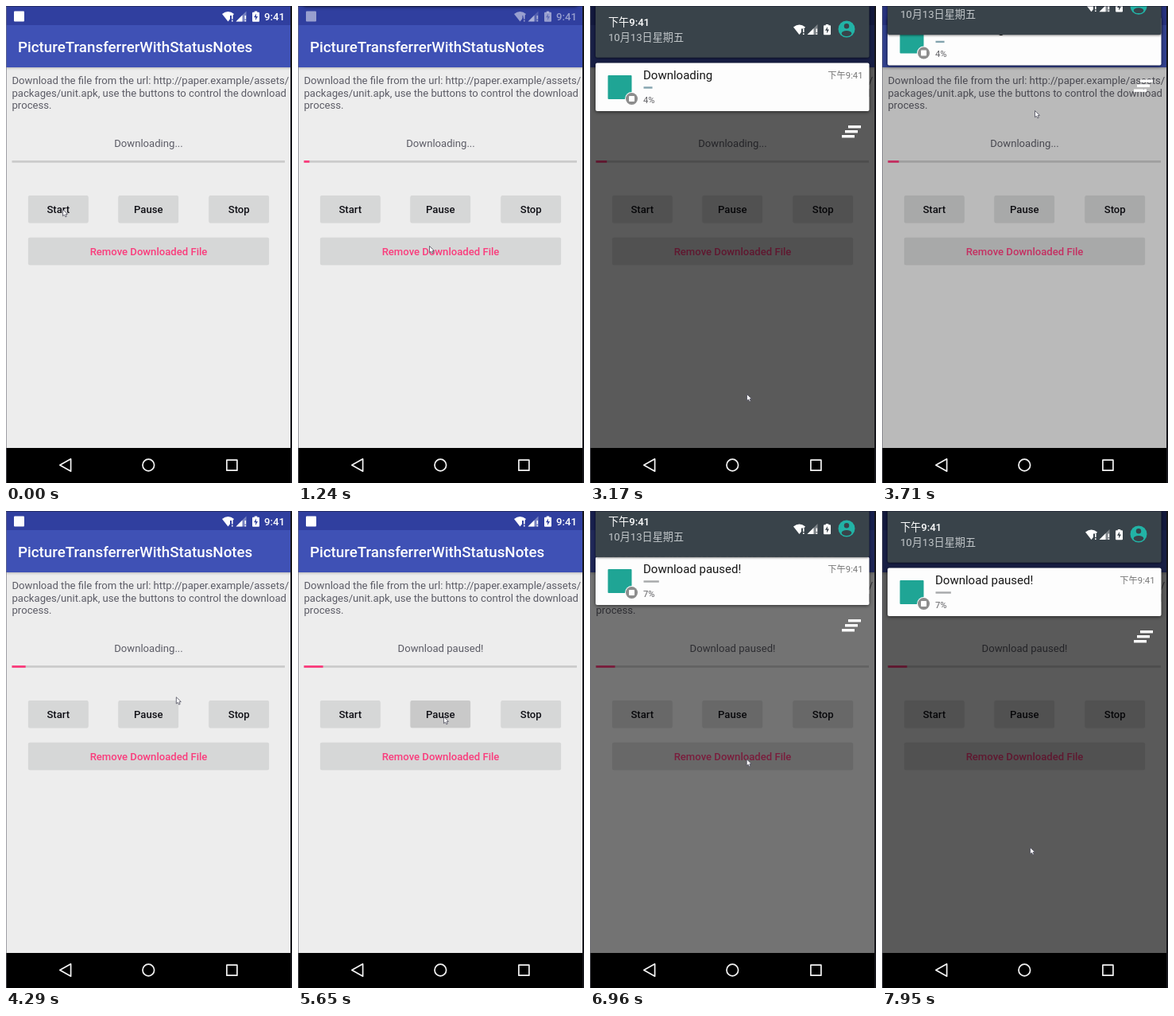
Animation, 360 px wide and 599 px high, one loop 8000 ms. Source, as an HTML page with a canvas:

```html
<!DOCTYPE html>
<html lang="zh-CN">
<head>
<meta charset="utf-8">
<style>
  html, body { margin: 0; width: 100%; height: 100%; overflow: hidden; background: #000; }
  canvas { display: block; width: 360px; height: 599px; }
</style>
</head>
<body>
<canvas id="stage" width="360" height="599"></canvas>
<script>
const ctx = document.getElementById('stage').getContext('2d');
const LOOP = 8000;
const FAMILY = 'Roboto, "Noto Sans CJK SC", "Noto Sans CJK", sans-serif';
const SLATE = '#39434a', PINK = '#fa3c7c', TEAL = '#1fa595', BODY_TEXT = '#5c5c66';
const CARD_BOTTOM = 132;

const spots = {
  start: [71, 255], between: [118, 198], topEdge: [165, 4], remove: [165, 301],
  pauseTop: [170, 265], shadeBottom: [197, 487], card: [192, 131], stop: [214, 234],
  pause: [183, 258], middle: [202, 348], abovePause: [184, 223], lower: [186, 422]
};
const glides = [
  { spot: 'between', from: 319, to: 320 },
  { spot: 'topEdge', from: 540, to: 600 },
  { spot: 'remove', from: 810, to: 1240 },
  { spot: 'pauseTop', from: 1660, to: 1850 },
  { spot: 'shadeBottom', from: 2330, to: 3020 },
  { spot: 'card', from: 3540, to: 3710 },
  { spot: 'stop', from: 3740, to: 4320 },
  { spot: 'pause', from: 4370, to: 4810 },
  { spot: 'topEdge', from: 5740, to: 6140 },
  { spot: 'middle', from: 6530, to: 6700 },
  { spot: 'abovePause', from: 6760, to: 7320 },
  { spot: 'lower', from: 7350, to: 7950 }
];

const clamp01 = v => Math.max(0, Math.min(1, v));

function ease(t, from, to) {
  const u = clamp01((t - from) / (to - from));
  return u * u * (3 - 2 * u);
}

function pointerAt(t) {
  return glides.reduce((pos, { spot, from, to }) => {
    const u = ease(t, from, to);
    return pos.map((v, i) => v + (spots[spot][i] - v) * u);
  }, spots.start);
}

function stateAt(t) {
  const open = ease(t, 1240, 1610) - ease(t, 3540, 3914) + ease(t, 6530, 7070);
  const touched = ease(t, 810, 900) - ease(t, 4000, 4320) + ease(t, 6530, 6620);
  return {
    open,
    shade: -CARD_BOTTOM * (1 - open),
    iconAlpha: 1 - touched / 2,
    percent: Math.max(0, Math.min(7, Math.floor(1 + (t - 320) / 850))),
    paused: t >= 5480,
    pressed: t >= 5400 && t < 5740
  };
}

function rect(x, y, w, h, color, r = 0) {
  ctx.fillStyle = color;
  ctx.beginPath();
  ctx.roundRect(x, y, w, h, r);
  ctx.fill();
}

function disc(x, y, r, color) {
  ctx.fillStyle = color;
  ctx.beginPath();
  ctx.arc(x, y, r, 0, Math.PI * 2);
  ctx.fill();
}

function poly(points, color) {
  ctx.fillStyle = color;
  ctx.beginPath();
  points.forEach(([x, y]) => ctx.lineTo(x, y));
  ctx.closePath();
  ctx.fill();
}

function text(str, x, y, size, color, { weight = 400, align = 'left' } = {}) {
  ctx.font = `${weight} ${size}px ${FAMILY}`;
  ctx.textAlign = align;
  ctx.fillStyle = color;
  ctx.fillText(str, x, y);
}

function withShadow(color, blur, dy, draw) {
  ctx.save();
  ctx.shadowColor = color;
  ctx.shadowBlur = blur;
  ctx.shadowOffsetY = dy;
  draw();
  ctx.restore();
}

function exclamation(x, y) {
  rect(x, y - 1, 1.6, 4.5, '#fff');
  rect(x, y + 4.8, 1.6, 1.6, '#fff');
}

function radioIcons(x, y, batteryGap, bg) {
  ctx.fillStyle = '#fff';
  ctx.beginPath();
  ctx.moveTo(x + 7.5, y + 6.5);
  ctx.lineTo(x, y - 3);
  ctx.quadraticCurveTo(x + 7.5, y - 9, x + 15, y - 3);
  ctx.closePath();
  ctx.fill();
  rect(x + 10, y - 1, 5, 8, bg);
  exclamation(x + 12, y);

  const signal = x + 17.5;
  poly([[signal, y + 6.5], [signal + 13, y + 6.5], [signal + 13, y - 6.5]], 'rgba(255,255,255,.35)');
  poly([[signal, y + 6.5], [signal + 8, y + 6.5], [signal + 8, y - 1.5]], '#fff');
  exclamation(signal + 11, y);

  const battery = x + batteryGap;
  rect(battery + 2.8, y - 6.5, 3.4, 2, '#fff');
  rect(battery, y - 5.3, 9, 12, '#fff', 1);
  poly([[battery + 5, y - 3.5], [battery + 2, y + 1.2], [battery + 4.2, y + 1.2],
        [battery + 4, y + 5], [battery + 7, y], [battery + 4.8, y]], bg);
}

function button(label, x, y, w, { fill = '#d6d7d7', color = '#101016' } = {}) {
  withShadow('rgba(0,0,0,.12)', 1, .5, () => rect(x, y, w, 34, fill, 2));
  text(label, x + w / 2, y + 22.3, 13.125, color, { weight: 500, align: 'center' });
}

function drawApp({ iconAlpha, paused, pressed, percent }) {
  rect(0, 0, 360, 555, '#ededed');
  withShadow('rgba(0,0,0,.25)', 3, 1, () => rect(0, 24, 360, 53, '#3f51b5'));
  rect(0, 0, 360, 24, '#303f9f');

  ctx.save();
  ctx.globalAlpha = iconAlpha;
  rect(10, 6.5, 13, 13, '#fff', 1);
  radioIcons(272, 13, 38, '#303f9f');
  text('9:41', 325, 17.6, 13.125, '#fff', { weight: 500 });
  ctx.restore();

  text('PictureTransferrerWithStatusNotes', 15, 58, 18.75, '#fff', { weight: 500 });
  const lines = [
    'Download the file from the url: http://paper.example/assets/',
    'packages/unit.apk, use the buttons to control the download',
    'process.'
  ];
  lines.forEach((line, i) => text(line, 7.5, 98.4 + i * 15.5, 13.125, BODY_TEXT));

  text(paused ? 'Download paused!' : 'Downloading...', 179.5, 176.6, 13.125, BODY_TEXT, { align: 'center' });
  rect(7.5, 194, 343.5, 2.8, '#cbcbcb');
  rect(7.5, 194, 3.435 * percent, 2.8, PINK);

  button('Start', 28, 238, 75.5);
  button('Pause', 141.5, 238, 75.5, { fill: pressed ? '#c9c9c9' : '#d6d7d7' });
  button('Stop', 255.5, 238, 75.5);
  button('Remove Downloaded File', 28, 290.8, 303, { color: PINK });
}

function drawCard({ open, shade, paused, percent }) {
  const solid = clamp01((open - .23) / .3);
  const grey = Math.round(185 + 68 * solid);
  ctx.save();
  ctx.translate(0, shade);
  ctx.globalAlpha = .85 + .15 * solid;
  withShadow('rgba(0,0,0,.6)', 4, 1, () => rect(7, 71.5, 344.5, 60.5, `rgb(${grey},${grey},${grey})`, 2));
  ctx.globalAlpha = 1;

  rect(22.5, 87, 30, 30, TEAL, 1);
  disc(52.5, 116.5, 8.5, `rgb(${grey},${grey},${grey})`);
  disc(52.5, 116.5, 7.5, '#8d8d8d');
  rect(49, 113, 7, 7, '#fff', .8);
  text(paused ? 'Download paused!' : 'Downloading', 67, 92, 15, '#161616');
  text('下午9:41', 343.5, 91.3, 11.25, '#757575', { align: 'right' });
  rect(67.5, 101.3, 2.76 * percent, 2.4, paused ? '#a6a8aa' : '#83a3ae');
  text(percent + '%', 67, 121.8, 11.25, '#626266');

  for (let i = 0; i < 3; i++) {
    rect(325 - 4 * i, 150 + 6 * i, 16, 3.4, `rgba(255,255,255,${solid})`);
  }
  ctx.restore();
}

function drawHeader({ shade }) {
  ctx.save();
  ctx.translate(0, shade / 2);
  withShadow('rgba(0,0,0,.7)', 3, .5, () => rect(7, -70, 344.5, 134.8, SLATE, 2));
  text('下午9:41', 23, 25, 13.125, '#fff', { weight: 500 });
  text('10月13日星期五', 23, 43.8, 13.125, '#c3c8cb');
  radioIcons(256, 29.5, 38, SLATE);
  disc(323, 29, 10.5, '#22b3a6');
  disc(323, 25.3, 3.2, SLATE);
  ctx.beginPath();
  ctx.ellipse(323, 34.5, 6.3, 3.4, 0, 0, Math.PI * 2);
  ctx.fill();
  ctx.restore();
}

function drawNavigation() {
  rect(0, 555, 360, 44, '#000');
  ctx.strokeStyle = '#f4f4f4';
  ctx.lineWidth = 1.7;
  ctx.lineJoin = 'round';
  ctx.beginPath();
  ctx.moveTo(67.8, 576.5);
  ctx.lineTo(81.6, 568.8);
  ctx.lineTo(81.6, 584.2);
  ctx.closePath();
  ctx.stroke();
  ctx.beginPath();
  ctx.arc(179.3, 576.5, 7.3, 0, Math.PI * 2);
  ctx.stroke();
  ctx.strokeRect(277.9, 570.2, 13, 13);
}

function drawPointer([x, y]) {
  const shape = [[0, 0], [0, 8.2], [2, 6.6], [3.4, 9.4], [4.8, 8.7], [3.6, 6], [6, 5.8]];
  poly(shape.map(([px, py]) => [x + px + .5, y + py + .5]), '#fff');
  ctx.strokeStyle = '#4a4a58';
  ctx.lineWidth = .8;
  ctx.stroke();
}

function drawFrameEdges() {
  rect(0, 0, 1, 599, 'rgba(110,110,120,.6)');
  rect(358, 0, 2, 599, '#15151a');
  rect(0, 0, 360, 1, 'rgba(20,20,40,.45)');
}

function render(t) {
  const state = stateAt(t);
  drawApp(state);
  if (state.open > 0) {
    const dim = .62 * clamp01((state.open - .235) / .765) ** 1.25;
    rect(0, 0, 360, 555, `rgba(0,0,0,${dim})`);
    drawCard(state);
    drawHeader(state);
  }
  drawNavigation();
  drawFrameEdges();
  drawPointer(pointerAt(t));
}

const start = performance.now();
function tick() {
  render((performance.now() - start) % LOOP);
  requestAnimationFrame(tick);
}
tick();
</script>
</body>
</html>
```
